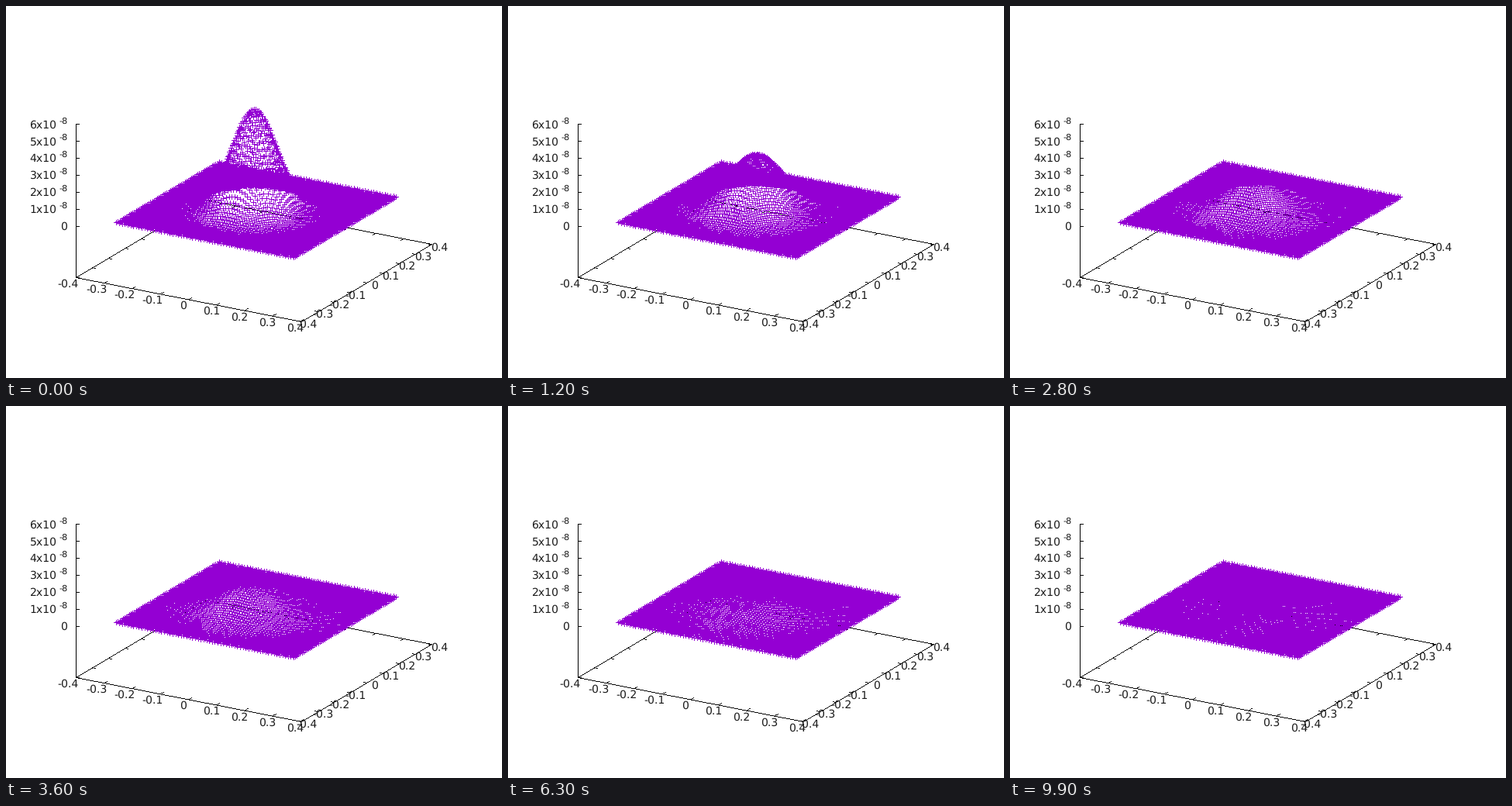
Recreate the animation shown at these times as a matplotlib script. Size 640x480 px, loop 10 s.

```python
import numpy as np
import matplotlib.pyplot as plt
from matplotlib.animation import FuncAnimation

W, H = 640, 480
FRAMES, INTERVAL = 100, 100
DPI = 80
PX = 72 / DPI
PURPLE = (0x94, 0x00, 0xD3, 255)
BLACK = (0, 0, 0, 255)

plt.rcParams["font.family"] = "DejaVu Sans"
plt.rcParams["text.hinting"] = "none"

# Projection: one unit of x, y and 1e-8 of z in pixels
CX, CY = 320, 329
UX = np.array([363.0, 71.2])
UY = np.array([210.0, -123.8])
UZ = 21.95
FLOOR = 66

# Heat spreading in three dimensions from a small bell, with cold walls
GRID = np.arange(-31, 33) * 0.01
PEAK = 130.0
VAR0 = 0.0051
VAR_STEP = 0.00021
ARM = 3


def project(x, y, lift=0.0):
    return CX + UX[0] * x + UY[0] * y, CY + UX[1] * x + UY[1] * y - lift


def profile(s, var):
    """Bell of the given variance as a sine series that is zero at both ends."""
    length = s[-1] - s[0]
    k = np.arange(1, 41)[:, None] * np.pi / length
    modes = np.exp(-k**2 * var / 2) * np.sin(-k * s[0]) * np.sin(k * (s - s[0]))
    return 2 / length * np.sqrt(2 * np.pi * VAR0) * modes.sum(axis=0)


def surface(n):
    """Axes covered by the surface, a small plus at each grid node."""
    p = profile(GRID, VAR0 + VAR_STEP * n)
    z = PEAK * p.max() * np.outer(p, p)
    gx, gy = np.meshgrid(GRID, GRID)
    px, py = project(gx, gy, FLOOR + z)
    col, row = np.rint(px).astype(int), np.rint(py).astype(int)
    img = axes_layer.copy()
    for d in range(-ARM, ARM + 1):
        img[row, col + d] = PURPLE
        img[row + d, col] = PURPLE
    return img


fig = plt.figure(figsize=(W / DPI, H / DPI), dpi=DPI, facecolor="white")
ax = fig.add_axes([0, 0, 1, 1])
ax.axis("off")
axes_layer = np.full((H, W, 4), 255, np.uint8)


def line(p, q):
    """Crisp line, one pixel wide."""
    (x0, y0), (x1, y1) = np.floor(p), np.floor(q)
    steps = int(max(abs(x1 - x0), abs(y1 - y0))) + 1
    cols = np.rint(np.linspace(x0, x1, steps)).astype(int)
    rows = np.rint(np.linspace(y0, y1, steps)).astype(int)
    axes_layer[rows, cols] = BLACK


def tick(p, d):
    line(p, (p[0] + d[0], p[1] + d[1]))


def label(x, y, s, ha="center", size=14):
    ax.text(x, y + 0.36 * size, s, ha=ha, va="baseline", fontsize=size * PX,
            color="#1c1c1c", zorder=3)


def draw_axes():
    r = 0.4
    corners = [project(*c) for c in ((-r, -r), (r, -r), (r, r), (-r, r))]
    for p, q in zip(corners, corners[1:] + corners[:1]):
        line(p, q)

    tx = 4 * UX / np.hypot(*UX)
    ty = 4 * UY / np.hypot(*UY)
    for i in range(-4, 5):
        v = i / 10
        s = f"{v:g}"
        shift = -3 if i < 0 else 0
        front, back = project(v, -r), project(v, r)
        right, left = project(r, v), project(-r, v)
        tick(front, ty)
        tick(back, -ty)
        tick(right, -tx)
        tick(left, tx)
        label(front[0] - 7.5 + shift, front[1] + 7.5, s)
        label(right[0] + 10 + shift, right[1] + 2.5, s)

    x, y = corners[0]
    line((x, y), (x, y - FLOOR - 6 * UZ))
    for k in range(7):
        yk = y - FLOOR - k * UZ
        tick((x, yk), (4, 0))
        if k:
            label(65.5, yk, f"{k}x10", "right")
            label(80, yk - 5, "-8", "right", 11.2)
        else:
            label(79, yk, "0", "right")


draw_axes()
image = ax.imshow(surface(0), extent=(0, W, H, 0), interpolation="nearest",
                  aspect="auto", zorder=2)
ax.set_xlim(0, W)
ax.set_ylim(H, 0)


def update(n):
    image.set_data(surface(n))
    return [image]


anim = FuncAnimation(fig, update, frames=FRAMES, interval=INTERVAL,
                     repeat=True, repeat_delay=0)
plt.show()
```
